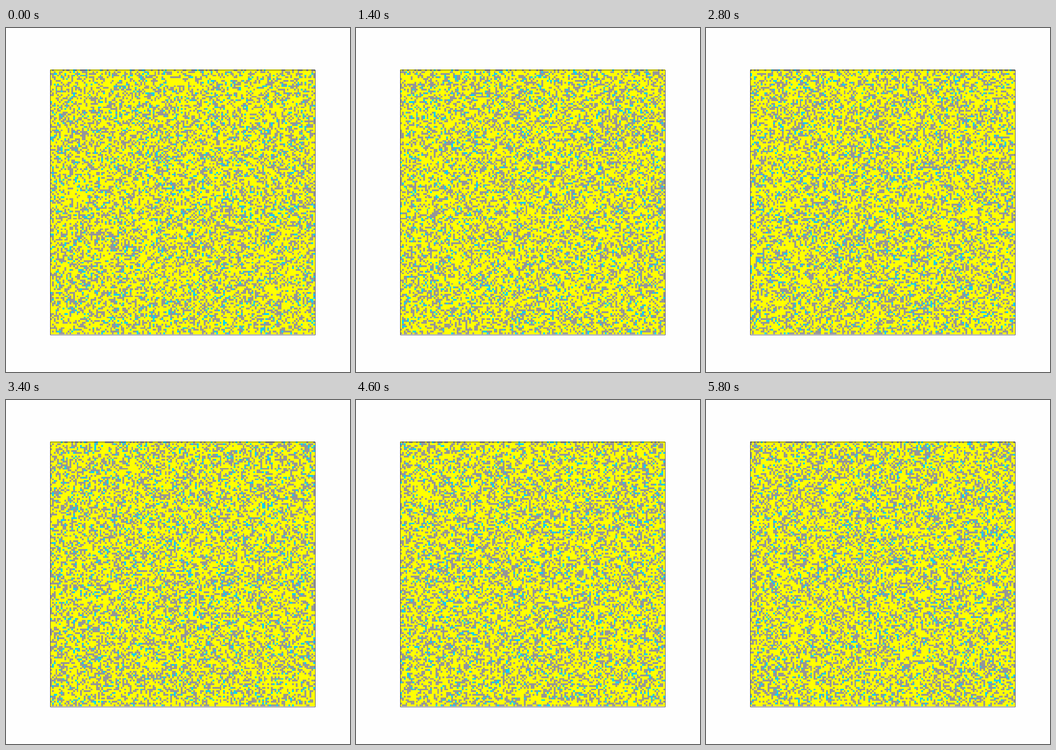
A matplotlib script for the animation above (6 s loop, 748 px wide and 748 px high).

```python
import numpy as np
import matplotlib.pyplot as plt
from matplotlib.animation import FuncAnimation
from matplotlib.colors import ListedColormap
from matplotlib.patches import Rectangle

STAGE, DPI = 748, 64
CELLS = 150
LEFT, TOP, SIDE = 96, 90, 576
STEP, FRAMES = 200, 30
COLORS = ["#ffff00", "#969696", "#00d2ff"]
SHARES = [0.60, 0.335, 0.065]


def lattice(step):
    """Random cell states of one time step."""
    rng = np.random.default_rng(1000 + step)
    return rng.choice(len(SHARES), size=(CELLS, CELLS), p=SHARES)


fig = plt.figure(figsize=(STAGE / DPI, STAGE / DPI), dpi=DPI, facecolor="#fefefe")
ax = fig.add_axes([0, 0, 1, 1])
ax.axis("off")

grid = ax.imshow(
    lattice(0),
    cmap=ListedColormap(COLORS),
    vmin=0,
    vmax=len(COLORS) - 1,
    interpolation="nearest",
    extent=(LEFT, LEFT + SIDE, TOP + SIDE, TOP),
    aspect="auto",
)
ax.add_patch(Rectangle((LEFT + 0.5, TOP + 0.5), SIDE, SIDE, fill=False,
                       edgecolor="#202028", linewidth=72 / DPI, alpha=0.85, zorder=3))
ax.set_xlim(0, STAGE)
ax.set_ylim(STAGE, 0)


def update(i):
    # the opening state is held for two ticks
    grid.set_data(lattice(max(i - 1, 0)))
    return (grid,)


anim = FuncAnimation(fig, update, frames=FRAMES, interval=STEP, repeat=True,
                     repeat_delay=0, blit=False)
plt.show()
```
